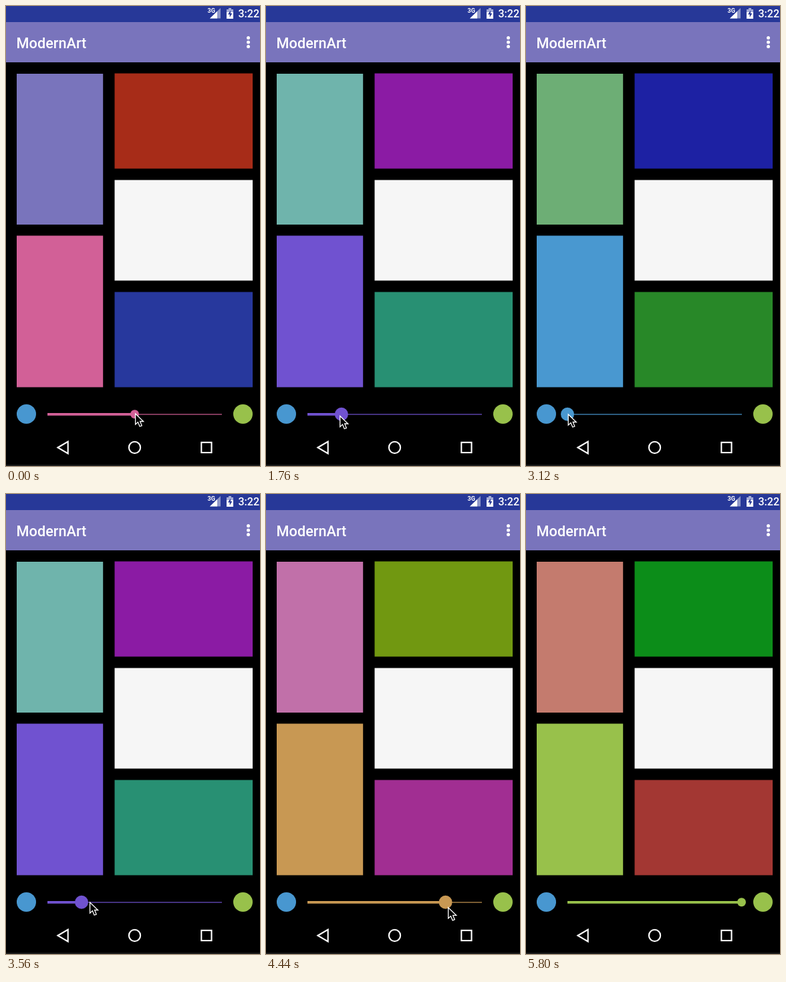
These frames come from a looping animation (380x686 px, 6440 ms). An HTML page:

```html
<!DOCTYPE html>
<html lang="en">
<head>
<meta charset="utf-8">
<title>ModernArt</title>
<style>
html, body { margin: 0; width: 100%; height: 100%; overflow: hidden; background: #000; }
svg { display: block; width: 380px; height: 686px; }
text { font-family: Roboto, sans-serif; font-weight: 500; fill: #fff; }
.nav { fill: none; stroke: #fff; stroke-width: 2.1; }
</style>
</head>
<body>
<svg viewBox="0 0 380 686">
  <rect width="380" height="686"/>
  <rect width="380" height="24" fill="#273898"/>
  <rect y="24" width="380" height="60" fill="#7974bc"/>
  <rect y="684" width="380" height="2" fill="#1c1c1c"/>

  <path d="M305 18.5L321 3V18.5Z" fill="#8c95c8"/>
  <path d="M305 18.5L316 8V18.5Z" fill="#fff"/>
  <text x="301.6" y="10" font-size="9" style="font-weight:700">3G</text>
  <path d="M333 3H337V5H340V10H330V5H333Z" fill="#a3abd6"/>
  <path d="M330 9H340V19H330Z" fill="#fff"/>
  <path d="M336 6.5L332 12.5H334.7V17L338.4 11H336Z" fill="#273898"/>
  <text x="347.5" y="17" font-size="16">3:22</text>

  <text x="15.6" y="62.8" font-size="21.7">ModernArt</text>
  <g fill="#fff">
    <circle cx="362.5" cy="47.5" r="2.5"/>
    <circle cx="362.5" cy="54" r="2.5"/>
    <circle cx="362.5" cy="60.5" r="2.5"/>
  </g>

  <rect class="tile" x="16" y="101" width="129.2" height="225"/>
  <rect class="tile" x="16" y="342.5" width="129.2" height="226"/>
  <rect class="tile" x="162.5" y="100.5" width="206.5" height="142"/>
  <rect class="tile" x="162.5" y="426.5" width="206.5" height="142"/>
  <rect x="162.5" y="259.5" width="206.5" height="150" fill="#f6f6f6"/>

  <circle cx="30.5" cy="608.5" r="14.5" fill="#4897d0"/>
  <circle cx="354.5" cy="608.5" r="14.5" fill="#98c14b"/>
  <rect id="rail" x="62" y="608.2" width="261" height="1.6" opacity=".75"/>
  <rect id="bar" x="62" y="607" height="3.8"/>
  <circle id="thumb" cy="608.7"/>

  <g class="nav">
    <path d="M77.5 658.5L92.7 649.5V667.5Z"/>
    <circle cx="192.5" cy="658.4" r="8.6"/>
    <rect x="292.3" y="650.8" width="15.2" height="15.2"/>
  </g>
  <path id="cursor" d="M0 0V16L3.8 12.6L6.5 19L9.6 17.8L7 11.5H12Z" fill="#000" stroke="#fff" stroke-width="1.3"/>
</svg>
<script>
const LOOP = 6440, TICK = 40, LEFT = 62, RIGHT = 322.5;

// Key points as [time, value]
const thumbX = [[520, 192.5], [2680, LEFT], [3120, LEFT], [3840, 161], [4960, RIGHT]];
const cursorX = [[440, 193.6], [2680, 62.6], [3080, 62.6], [3840, 175.6], [5100, 336], [5600, 336], [5800, 384]];
const cursorY = [[440, 608], [1760, 611.5], [2680, 609], [3700, 609], [4500, 617]];
const radius = [[440, 6.5], [560, 10], [5600, 10], [5760, 6.5]];

// HSL of each tile with the slider at the left, middle and right
const tints = [
  [[128, 29, 55.5], [244, 35, 59.5], [369, 42, 60]],
  [[205, 59, 55], [331, 55.5, 60], [441, 49, 52.5]],
  [[238, 70, 37.5], [368, 75, 37.5], [486, 84, 30]],
  [[120, 55, 34.5], [231, 60, 38.5], [362, 52, 42]]
];

function tint(keys, p) {
  const i = p < .5 ? 0 : 1, k = p * 2 - i;
  const [h, s, l] = keys[i].map((v, n) => v + (keys[i + 1][n] - v) * k);
  return `hsl(${h % 360}, ${s}%, ${l}%)`;
}

// Smooth curve through the key points without overshoot
function sample(keys, t) {
  const last = keys.length - 1;
  if (t <= keys[0][0]) return keys[0][1];
  if (t >= keys[last][0]) return keys[last][1];
  const i = keys.findIndex(key => key[0] > t) - 1;
  const slope = j => (keys[j + 1][1] - keys[j][1]) / (keys[j + 1][0] - keys[j][0]);
  const tangent = j => {
    if (j === 0 || j === last) return 0;
    const a = slope(j - 1), b = slope(j);
    return a * b > 0 ? 2 * a * b / (a + b) : 0;
  };
  const [t0, y0] = keys[i], [t1, y1] = keys[i + 1];
  const w = t1 - t0, u = (t - t0) / w, r = 1 - u;
  return y0 * (1 + 2 * u) * r * r + tangent(i) * w * u * r * r
    + y1 * u * u * (3 - 2 * u) - tangent(i + 1) * w * u * u * r;
}

const $ = id => document.getElementById(id);
const tiles = document.querySelectorAll('.tile');
const rail = $('rail'), bar = $('bar'), thumb = $('thumb'), cursor = $('cursor');

function draw(time) {
  const t = Math.floor(time % LOOP / TICK) * TICK;
  const x = sample(thumbX, t), p = (x - LEFT) / (RIGHT - LEFT);
  const colors = tints.map(keys => tint(keys, p));
  tiles.forEach((tile, i) => tile.setAttribute('fill', colors[i]));
  for (const part of [rail, bar, thumb]) part.setAttribute('fill', colors[1]);
  bar.setAttribute('width', x - LEFT);
  thumb.setAttribute('cx', x);
  thumb.setAttribute('r', sample(radius, t));
  cursor.setAttribute('transform', `translate(${sample(cursorX, t)} ${sample(cursorY, t)})`);
}

const start = performance.now();
function tick(now) {
  draw(Math.max(0, now - start));
  requestAnimationFrame(tick);
}
draw(0);
requestAnimationFrame(tick);
</script>
</body>
</html>
```
